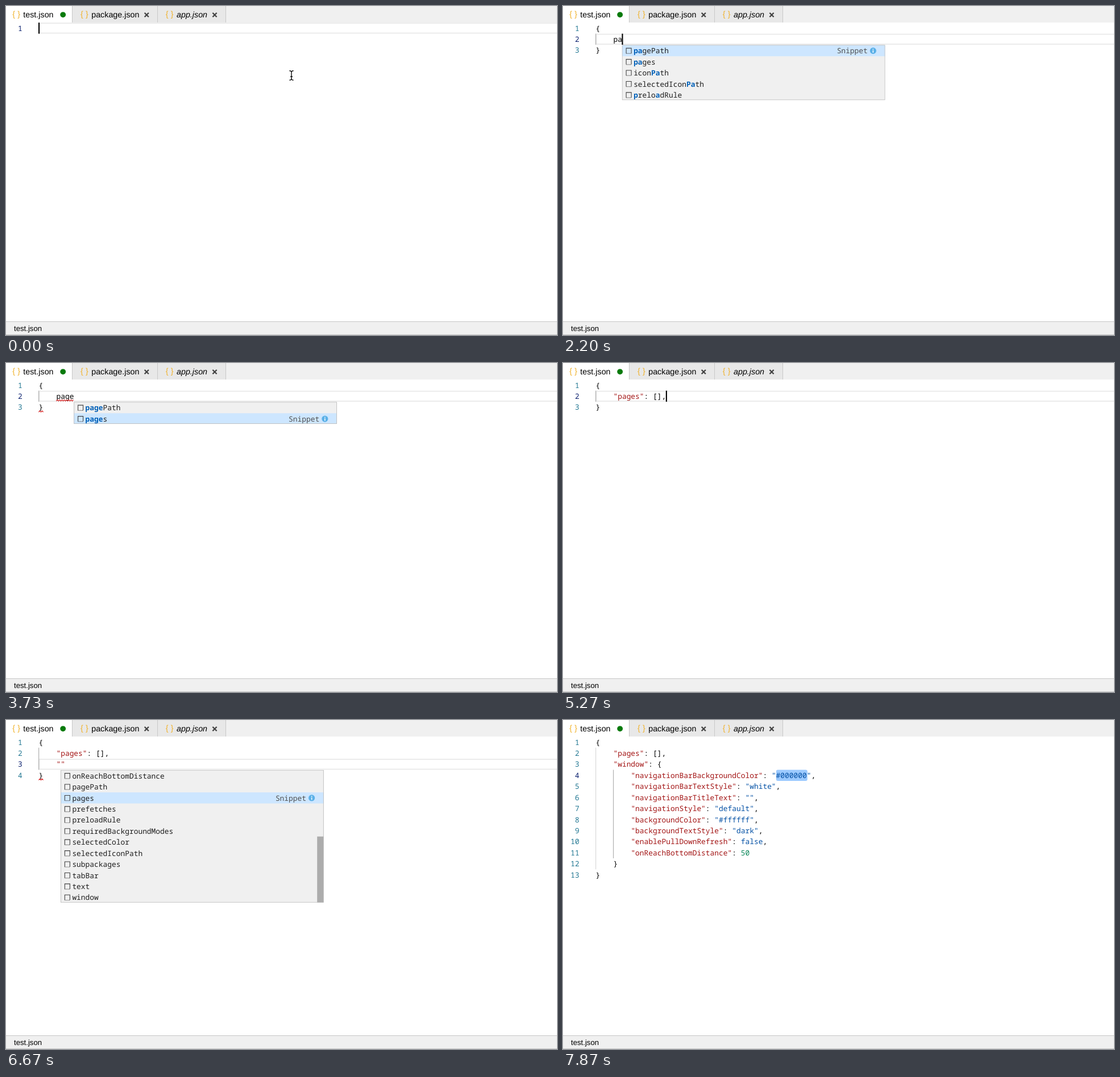
An HTML page that plays this animation: 969 by 578 pixels, repeating every 8000 ms.

```html
<!DOCTYPE html>
<html lang="en">
<head>
<meta charset="utf-8">
<title>JSON snippets</title>
<style>
  html, body { margin: 0; width: 100%; height: 100%; overflow: hidden; background: #fff; }
  svg { display: block; }
  text { white-space: pre; text-rendering: geometricPrecision; }
  .ui { font: 14.3px "Liberation Sans", Arial, sans-serif; }
  .code { font: 12.9px "Noto Sans Mono", "DejaVu Sans Mono", monospace; }
  .key { fill: #a31515; }
  .val { fill: #0451a5; }
  .num { fill: #098658; }
  .hit { fill: #0060b8; font-weight: 700; }
</style>
</head>
<body>
<svg width="969" height="578" viewBox="0 0 969 578">
  <g id="editor"></g>
  <g id="chrome"></g>
</svg>
<script>
const LOOP = 8000, LEFT = 57.5, TOP = 29.2, CW = 7.74, LH = 19.43;
const colX = c => LEFT + c * CW;
const lineY = n => TOP + n * LH;

const rect = (x, y, w, h, fill, more = '') =>
  `<rect x="${x}" y="${y}" width="${w}" height="${h}" fill="${fill}" ${more}/>`;
const path = (d, stroke, width, more = '') =>
  `<path d="${d}" fill="none" stroke="${stroke}" stroke-width="${width}" ${more}/>`;
const text = (x, y, s, cls, more = '') =>
  `<text x="${x}" y="${y}" class="${cls}" ${more}>${s}</text>`;
const span = (cls, s) => `<tspan class="${cls}">${s}</tspan>`;

// ---- content ----
const tail = ['onReachBottomDistance', 'pagePath', 'pages', 'prefetches', 'preloadRule',
  'requiredBackgroundModes', 'selectedColor', 'selectedIconPath', 'subpackages',
  'tabBar', 'text', 'window'];
const startP = ['pagePath', 'pages', 'prefetches', 'preloadRule', 'iconPath',
  'selectedIconPath', 'enablePullDownRefresh', 'subpackages'];
const startPa = ['pagePath', 'pages', 'iconPath', 'selectedIconPath', 'preloadRule'];
const startPag = ['pagePath', 'pages'];

const pagesLine = '    "pages": []';
const finished = ['{', pagesLine + ',', '    "window": {',
  ...['"navigationBarBackgroundColor": "#000000",', '"navigationBarTextStyle": "white",',
    '"navigationBarTitleText": "",', '"navigationStyle": "default",',
    '"backgroundColor": "#ffffff",', '"backgroundTextStyle": "dark",',
    '"enablePullDownRefresh": false,', '"onReachBottomDistance": 50'].map(s => '        ' + s),
  '    }', '}'];

const word = w => ({ lines: ['{', '    ' + w, '}'], col: 4 + w.length, on: 1 });
const third = s => ['{', pagesLine + ',', '    ' + s, '}'];
const list = (items, col, query = '', sel = 0) => ({ pop: { items, col, query, sel } });

// Each step changes part of the editor state.
// guides: [col, first line, last line, active]; marks: [line, col, length]
const steps = [
  [0, { lines: [''], line: 0, col: 0, on: 1, mouse: 1, guides: [], marks: [], pop: null, pick: null }],
  [400, { on: 0 }],
  [730, { on: 1, lines: ['{'], col: 1 }],
  [800, { lines: ['{}'], mouse: 0 }],
  [1070, { lines: ['{', '    ', '}'], line: 1, col: 4 }],
  [1930, { on: 0 }],
  [2070, { ...word('p'), guides: [[0, 1, 1, 1]] }],
  [2130, list(startP, 5, 'p')],
  [2200, { ...word('pa'), ...list(startPa, 6, 'pa') }],
  [2270, { marks: [[2, 0, 1]] }],
  [2330, { marks: [[1, 4, 2], [2, 0, 1]] }],
  [2670, word('pag')],
  [2730, list(startPag, 7, 'pag')],
  [3000, word('page')],
  [3070, list(startPag, 8, 'page')],
  [3330, { marks: [[1, 4, 4], [2, 0, 1]] }],
  [3400, { on: 0 }],
  [3730, list(startPag, 8, 'page', 1)],
  [3870, { on: 1 }],
  [3930, { ...word('"pages": []'), col: 14, pop: null, marks: [[2, 0, 1]] }],
  [4200, { col: 15 }],
  [4670, { marks: [] }],
  [4730, { on: 0 }],
  [5200, word('"pages": [],')],
  [5470, { lines: third(''), line: 2, col: 4, guides: [[0, 1, 2, 1]] }],
  [5930, { on: 0 }],
  [6000, { marks: [[1, 15, 1]] }],
  [6200, { lines: third('""'), col: 5, on: 1 }],
  [6270, list(tail, 5, '', 2)],
  [6670, { on: 0, marks: [[3, 0, 1]] }],
  [7130, { lines: third('"w"'), col: 6, on: 1, ...list(['window'], 6, 'w') }],
  [7400, { lines: finished, line: 3, col: 48, pick: [41, 48], pop: null,
    guides: [[0, 1, 11, 0], [4, 3, 10, 1]], marks: [[12, 0, 1]] }],
  [7870, { on: 0, marks: [] }]
];

// ---- drawing ----
const paint = line => line.replace(/^( *)("[^"]*")|"[^"]*"|false|\d+/g, (all, pad, key) =>
  key ? pad + span('key', key) : span(/^\d/.test(all) ? 'num' : 'val', all));

function highlight(name, query) {
  let i = 0;
  return [...name].map(c =>
    i < query.length && c.toLowerCase() === query[i] ? (i++, span('hit', c)) : c).join('');
}

function squiggle([line, col, len]) {
  const y = lineY(line) + 37.6 - LH, end = colX(col + len);
  let x = colX(col), d = `M${x} ${y}`;
  for (let up = true; x < end - 1; up = !up) d += `L${x += 2} ${y + (up ? -2.2 : 0)}`;
  return path(d, '#d81e1e', 1.2);
}

function popup({ items, col, query, sel }, line, t) {
  const x = colX(col) - .3, y = lineY(line + 1) + .2, w = 463, h = items.length * LH;
  let out = `<clipPath id="clip">${rect(x, y, w, h, '#000')}</clipPath><g clip-path="url(#clip)">`
    + rect(x, y, w, h, '#f0f0f0');
  items.forEach((name, i) => {
    const top = y + .6 + i * LH, mid = top + 9.8, ix = x + 7.5;
    if (i === sel) out += rect(x, top, w, LH, '#cde6ff')
      + text(x + 378, mid + 4.6, 'Snippet', 'code', 'fill="#505050"')
      + `<circle cx="${x + 441.7}" cy="${mid}" r="5.6" fill="#5cb1e8"/>`
      + path(`M${x + 441.7} ${mid - 3.4}v1.6m0 1v4.2`, '#fff', 1.5);
    out += path(`M${ix} ${mid + 4.5}v-9h9v9`, '#424242', 1.1)
      + path(`M${ix} ${mid + 4.7}h9.5`, '#424242', 1.2, 'stroke-dasharray="1.2 1.2"')
      + text(x + 20.5, mid + 4.6, highlight(name, query), 'code', 'fill="#1e1e1e"');
  });
  if (items === tail) {
    const fade = Math.max(0, Math.min(1, 1 - (t - 6670) / 800));
    out += rect(x + 451.3, y + 117, 11.2, h - 117, '#acacac', `opacity="${fade}"`);
  }
  return out + rect(x + .5, y + .5, w - 1, h - 1, 'none', 'stroke="#bebebe"') + '</g>';
}

function ibeam(x, y) {
  const d = `M${x - 3.6} ${y - 8.3}q3.6 0 3.6 3v10.6q0 3 -3.6 3`
    + `M${x + 3.6} ${y - 8.3}q-3.6 0 -3.6 3v10.6q0 3 3.6 3M${x - 2} ${y + 2}h4`;
  return path(d, '#fff', 3) + path(d, '#111', 1.4);
}

function draw(t) {
  const s = Object.assign({}, ...steps.filter(([at]) => at <= t).map(([, change]) => change));
  let out = '';
  if (s.pick) {
    const [a, b] = s.pick;
    out += rect(colX(a), lineY(s.line), (b - a) * CW + .8, LH, '#9ccaff', 'rx="3"');
  } else {
    out += rect(58.3, lineY(s.line) + 1, 1000, LH - 2, 'none', 'stroke="#eaeaea" stroke-width="1.9"');
  }
  for (const [col, a, b, active] of s.guides)
    out += rect(colX(col) - .3, lineY(a), 1, (b - a + 1) * LH, active ? '#a0a0a0' : '#d0d0d0');
  s.lines.forEach((line, n) => {
    const y = lineY(n) + 14.4;
    out += text(28.8, y, n + 1, 'code', `text-anchor="end" fill="${n === s.line ? '#0b216f' : '#237893'}"`)
      + text(LEFT, y, paint(line), 'code');
  });
  out += s.marks.map(squiggle).join('');
  if (s.on) out += rect(colX(s.col) - .5, lineY(s.line), 2.1, LH, '#000');
  if (s.pop) out += popup(s.pop, s.line, t);
  if (s.mouse) out += ibeam(502, 122);
  return out;
}

function chrome() {
  const icon = x => text(x, 18.6, '{', 'ui', 'fill="#f0b32e"') + text(x + 9, 18.6, '}', 'ui', 'fill="#f0b32e"');
  const close = x => path(`M${x - 3.6} 12l7.2 7.2m0 -7.2l-7.2 7.2`, '#424242', 2.3);
  return rect(0, 0, 969, 29, '#f0f0f0') + rect(0, 0, 116, 29, '#fff') + rect(117, 0, 269, 29, '#e8e8e8')
    + [116, 266, 386].map(x => rect(x, 0, 1, 29, '#c8c8c8')).join('')
    + icon(11.3) + icon(131) + icon(280.8)
    + text(30.3, 19.8, 'test.json', 'ui') + text(150.2, 19.8, 'package.json', 'ui')
    + text(300, 19.8, 'app.json', 'ui', 'font-style="italic" style="font-style:italic"')
    + '<circle cx="100.2" cy="15.3" r="4.9" fill="#067a0a"/>' + close(247.3) + close(367)
    + rect(0, 554, 969, 24, '#f0f0f0') + rect(0, 554, 969, 1, '#c6c6c6') + rect(0, 577, 969, 1, '#c6c6c6')
    + text(14, 570.6, 'test.json', 'ui', 'style="font-size:13.2px"');
}

const editor = document.getElementById('editor');
document.getElementById('chrome').innerHTML = chrome();
let shown = '';
const start = performance.now();
function tick() {
  const next = draw((performance.now() - start) % LOOP);
  if (next !== shown) editor.innerHTML = shown = next;
  requestAnimationFrame(tick);
}
tick();
</script>
</body>
</html>
```
